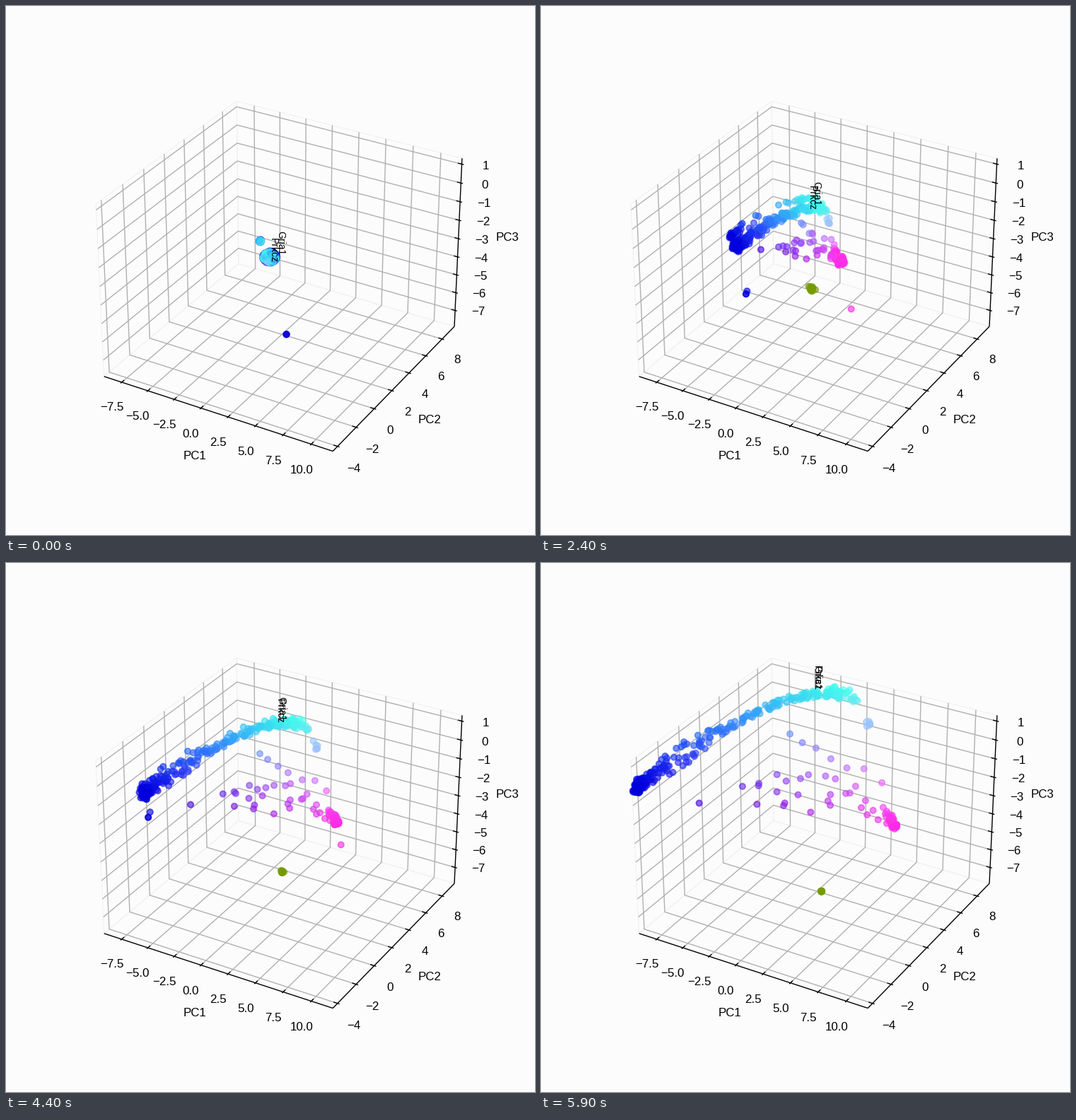
Write a matplotlib script that moves like this. It is 748 px wide and 748 px high and loops after 6000 ms.

```python
import numpy as np
import matplotlib.pyplot as plt
from matplotlib.animation import FuncAnimation
from matplotlib.collections import LineCollection

SIZE, DPI = 748, 100
FRAMES, INTERVAL = 60, 100
FONT = "Liberation Sans"

# Box limits, and the half sizes it has in the scene.
LOW = np.array([-9.214, -4.497, -7.913])
HIGH = np.array([11.896, 9.53, 1.307])
HALF = np.array([0.5952, 0.5952, 0.4464])

# Camera: elevation 30, azimuth -60, viewed from ten units away.
ELEV, AZIM = np.radians(30), np.radians(-60)
TOWARD = np.array([np.cos(ELEV) * np.cos(AZIM),
                   np.cos(ELEV) * np.sin(AZIM), np.sin(ELEV)])
RIGHT = np.array([-np.sin(AZIM), np.cos(AZIM), 0])
UP = np.cross(TOWARD, RIGHT)
CENTER, SCALE = np.array([390.9, 370.1]), 3113

# The side of the box, 0 or 1, on which each axis has its visible pane.
FAR = (0, 1, 0)
TICKS = [(np.arange(-7.5, 10.1, 2.5), "{:.1f}"),
         (np.arange(-4, 9, 2), "{:.0f}"),
         (np.arange(-7, 2), "{:.0f}")]

BLUE, CYAN, PINK, OLIVE = (np.array(c) / 255 for c in (
    (0, 0, 221), (75, 247, 238), (255, 45, 230), (118, 155, 0)))
LONE_SPOT = (396.5, 464.3)

rng = np.random.default_rng(11)

fig = plt.figure(figsize=(SIZE / DPI, SIZE / DPI), dpi=DPI, facecolor="#fcfcfc")
ax = fig.add_axes([0, 0, 1, 1])
ax.set_xlim(0, SIZE)
ax.set_ylim(SIZE, 0)
ax.axis("off")


def project(fractions):
    """Map fractions of the box to stage pixels."""
    p = (np.asarray(fractions, float) * 2 - 1) * HALF
    depth = 10 - p @ TOWARD
    flat = np.stack([p @ RIGHT, -(p @ UP)], axis=-1)
    return CENTER + SCALE * flat / depth[..., None]


def spot(axis, along, others):
    """Pixel of a point: one fraction along an axis, two for the others."""
    return project(np.insert(np.array(others, float), axis, along))


def label(x, y, text):
    ax.text(x, y, text, family=FONT, size=12.2, ha="center", va="baseline")


def draw_box():
    square = [(0, 0), (1, 0), (1, 1), (0, 1), (0, 0)]
    panes, grid, black = [], [], []
    for axis, (ticks, fmt) in enumerate(TICKS):
        panes.append([spot(axis, FAR[axis], corner) for corner in square])
        far_a, far_b = (side for i, side in enumerate(FAR) if i != axis)
        near_a, near_b = 1 - far_a, 1 - far_b
        out_a, out_b = 2 * near_a - 1, 2 * far_b - 1
        black.append([spot(axis, end, (near_a, far_b)) for end in (0, 1)])
        for value in ticks:
            f = (value - LOW[axis]) / (HIGH[axis] - LOW[axis])
            grid.append([spot(axis, f, pair) for pair in (
                (near_a, far_b), (far_a, far_b), (far_a, near_b))])
            black.append([spot(axis, f, (near_a + out_a * d, far_b))
                          for d in (-0.2 / 12, 0.1 / 12)])
            x, y = spot(axis, f, (near_a + out_a * 0.07, far_b + out_b * 0.07))
            label(x - 0.5, y + 11.6, fmt.format(value).replace("-", "\u2212"))
    for order, (lines, color, width) in enumerate((
            (panes, "#f1f1f1", 0.8), (grid, "#b0b0b0", 1.0), (black, "black", 1.0))):
        ax.add_collection(LineCollection(lines, colors=color, linewidths=width,
                                         zorder=order + 1), autolim=False)
    label(267.5, 641, "PC1")
    label(599, 590, "PC2")
    label(709, 332, "PC3")


def blob(center, spread, count):
    return rng.normal(center, spread, (count, 2))


def band(p0, p1, p2, p3, t, width):
    """Points scattered above and below a cubic curve."""
    s = t[:, None]
    line = ((1 - s) ** 3 * p0 + 3 * s * (1 - s) ** 2 * p1
            + 3 * s ** 2 * (1 - s) * p2 + s ** 3 * p3)
    line[:, 1] += width * rng.uniform(-1, 1, len(t))
    return line


def start_points(count):
    """Tight oval cloud, with some points in a small knot above it."""
    angle = rng.uniform(0, 2 * np.pi, count)
    radius = np.sqrt(rng.uniform(0, 1, count))
    cloud = np.column_stack([373 + 10 * radius * np.cos(angle),
                             355 + 8.5 * radius * np.sin(angle)])
    knot = blob((359.5, 332.3), 0.7, count)
    return np.where(rng.random((count, 1)) < 0.13, knot, cloud)


def end_points():
    """Arc from blue to cyan, and a loose bridge from blue to pink."""
    t = rng.uniform(0, 1, 190)
    arc = band((142, 312), (203, 269), (364, 148), (448, 196), t,
               5 + 14 * np.exp(-((t - 0.22) / 0.15) ** 2))
    t = rng.uniform(0, 1, 36) ** 0.6
    bridge = band((190, 332), (300, 325), (440, 310), (500, 368), t,
                  6 + 24 * np.sin(np.pi * t))
    t = np.linspace(0, 1, 7)
    upper = band((352, 234), (385, 262), (430, 285), (482, 303), t, 8)
    pale = blob((463, 228), (3, 4), 6)
    blue = blob((138.5, 315), (3.6, 4), 160)
    blue[:, 1] -= 0.55 * (blue[:, 0] - 138.5)
    cyan = blob((417, 182), (9, 4), 30)
    pink = blob((500, 371.5), (2, 1.3), 40)
    tail = blob((495, 362), (3, 4), 14)
    ends = np.vstack([arc, bridge, upper, pale, blue, cyan, pink, tail])
    ends[:, 0] = np.clip(ends[:, 0], 130, 503)
    # Mostly bottom to top, so that cyan tends to cover the rest.
    return ends[np.argsort(rng.normal(-ends[:, 1], 50))]


def colors_at(ends):
    """Blend three corner colours by where a point finally lands."""
    origin = np.array([139, 315])
    basis = np.array([[425, 183], [500, 372]]) - origin
    a, b = np.linalg.solve(basis.T, (ends - origin).T)[..., None]
    middle = np.clip(4 * a * (1 - a), 0, 1)
    mix = (1 - a - b) * BLUE + a * CYAN + b * PINK
    return np.clip(mix + middle * (0.14, -0.05, 0.08), 0, 1)


def build_cloud():
    olive = blob(LONE_SPOT, 0.3, 26)
    main = end_points()
    far = np.array([(500, 376), (138, 314), (134.5, 324), (134.5, 324)])
    starts = np.vstack([blob((372.5, 355), 3.6, len(olive)),
                        start_points(len(main)),
                        np.full(far.shape, LONE_SPOT)])
    colors = np.vstack([np.tile(OLIVE, (len(olive), 1)),
                        colors_at(main), colors_at(far)])
    rgba = np.column_stack([colors, np.full(len(colors), 0.6)])
    return starts, np.vstack([olive, main, far]), rgba


draw_box()
starts, ends, rgba = build_cloud()
dots = ax.scatter(*starts.T, s=36, c=rgba, edgecolors=rgba, linewidths=1.3, zorder=5)

GENES = [("Gria1", (388, 318), (390, 145)),
         ("Prkcz", (378, 328), (390, 145))]
tags = [ax.text(*a, name, family=FONT, size=10, rotation=270,
                ha="center", va="top", zorder=6) for name, a, _ in GENES]


def update(frame):
    t = frame / (FRAMES - 1)
    dots.set_offsets(starts + (ends - starts) * t)
    for tag, (_, a, b) in zip(tags, GENES):
        tag.set_position(np.array(a) + (np.array(b) - a) * t)
    return [dots, *tags]


anim = FuncAnimation(fig, update, frames=FRAMES, interval=INTERVAL,
                     repeat=True, repeat_delay=0, blit=False)
plt.show()
```
